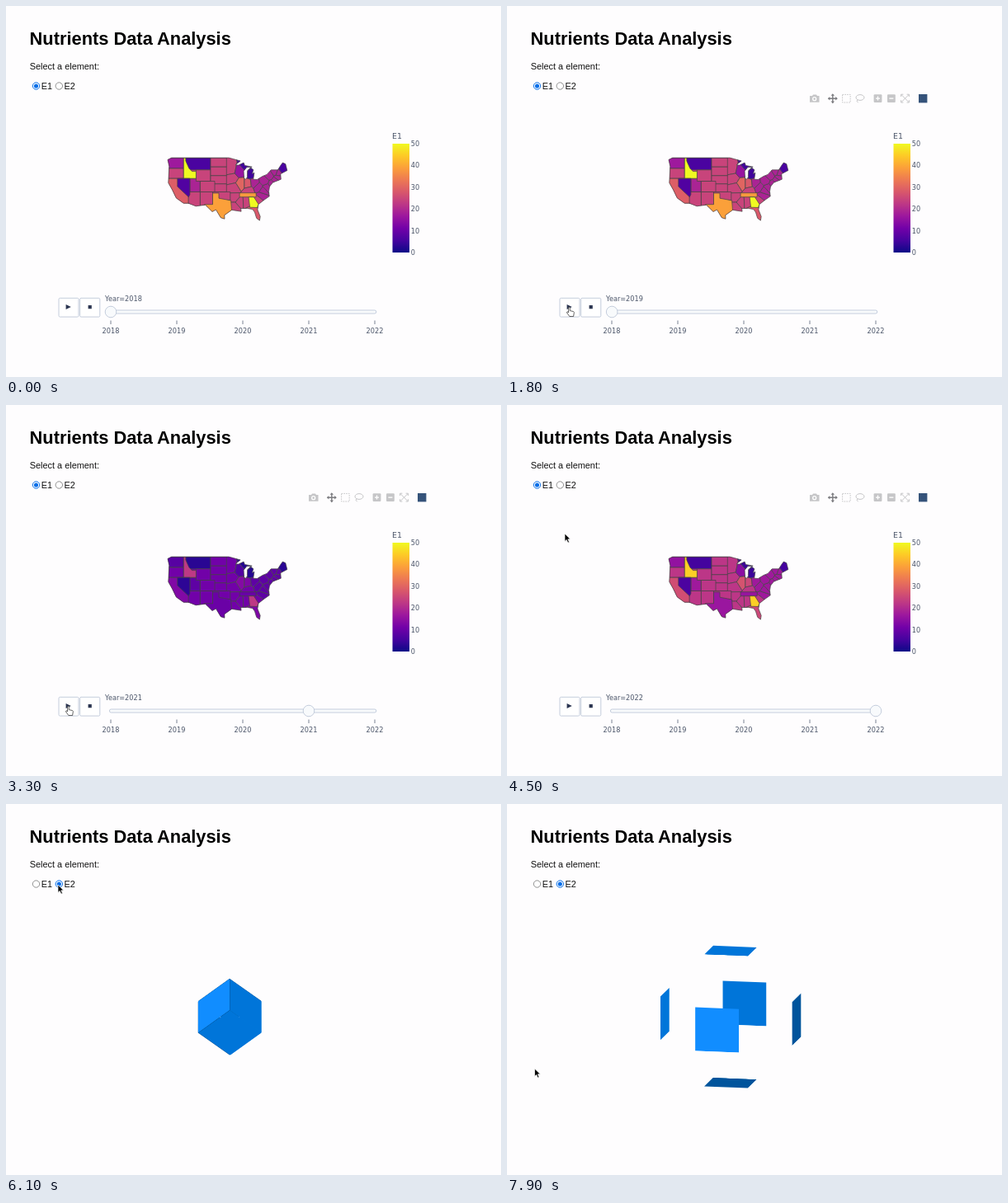
An HTML page that plays this animation: 600 px wide and 450 px high, repeating every 8 s.

```html
<!DOCTYPE html>
<html lang="en">
<head>
<meta charset="utf-8">
<title>Nutrients Data Analysis</title>
<style>
  html, body { margin: 0; width: 100%; height: 100%; overflow: hidden; background: #fefdfe; }
  svg { position: absolute; left: 0; top: 0; }
  .page { font: 10.9px "Liberation Sans", Arial, sans-serif; fill: #111; }
  .page .title { font-size: 21.84px; font-weight: bold; fill: #000; }
  #plot { font: 8.16px "DejaVu Sans", Verdana, sans-serif; fill: #4a5468; }
  .mid { text-anchor: middle; }
  .control { fill: #fff; stroke: #bec8d9; stroke-width: .9; }
  .soft { fill: #f8fafc; }
  .glyph { fill: #2a3450; }
  #states path { stroke: #444; stroke-width: .7; stroke-linejoin: round; }
  #modebar { fill: #c6c6c8; }
  #modebar .line { fill: none; stroke: #c6c6c8; }
  #modebar .sign { fill: none; stroke: #fff; stroke-width: 1.3; }
  #modebar .active { fill: #7c7c80; }
  .ring { fill: #fff; stroke: #767676; stroke-width: .8; }
  .on .ring { stroke: #0a6fe8; stroke-width: 1; }
  .dot { fill: #0a6fe8; visibility: hidden; }
  .on .dot { visibility: visible; }
  #cube {
    position: absolute; left: 244.3px; top: 230.5px; width: 54.4px; height: 54.4px;
    transform-style: preserve-3d; transform: rotateX(var(--turn)) rotateY(var(--turn));
  }
  #cube i { position: absolute; inset: 0; background: #0075d9; transform: var(--side) translateZ(var(--gap)); }
  #cube .front { --side: rotateY(0deg); background: #118dff; }
  #cube .back { --side: rotateY(180deg); }
  #cube .left { --side: rotateY(-90deg); }
  #cube .right { --side: rotateY(90deg); background: #00549c; }
  #cube .top { --side: rotateX(90deg); }
  #cube .bottom { --side: rotateX(-90deg); background: #00549c; }
</style>
</head>
<body>
<svg width="600" height="450" viewBox="0 0 600 450">
  <defs>
    <linearGradient id="scale" x1="0" y1="1" x2="0" y2="0"></linearGradient>
    <clipPath id="land"><path id="coast"/></clipPath>
  </defs>
  <g class="page">
    <text class="title" x="28.6" y="47">Nutrients Data Analysis</text>
    <text x="28.8" y="76.5">Select a element:</text>
    <g id="radio1"><circle class="ring" cx="36.5" cy="97" r="4.2"/><circle class="dot" cx="36.5" cy="97" r="2.6"/></g>
    <text x="42.8" y="101">E1</text>
    <g id="radio2"><circle class="ring" cx="64.3" cy="97" r="4.2"/><circle class="dot" cx="64.3" cy="97" r="2.6"/></g>
    <text x="70.6" y="101">E2</text>
  </g>
  <g id="plot">
    <g id="states" clip-path="url(#land)"></g>
    <use href="#coast" fill="none" stroke="#444" stroke-width=".7"/>
    <text x="468" y="161" font-size="9.4">E1</text>
    <rect x="468.5" y="167" width="20.5" height="132" fill="url(#scale)"/>
    <g id="ticks"></g>
    <rect class="control" x="64" y="354.3" width="24" height="22.8" rx="1.5"/>
    <rect class="control" x="89.6" y="354.3" width="24.2" height="22.8" rx="1.5"/>
    <path class="glyph" d="M72.6 362l6.2 3-6.2 3zM99.6 363h4.2v4.2h-4.2z"/>
    <text id="year" x="120" y="357.8"></text>
    <rect class="control soft" x="125.4" y="369" width="323.4" height="4" rx="2"/>
    <circle id="grip" class="control soft" cy="371" r="6.8"/>
    <g id="modebar">
      <path d="M367 109h3l1-1.5h4l1 1.5h2.5v7.8H367z"/>
      <circle class="sign" cx="372.7" cy="112.7" r="2"/>
      <path d="M394.8 107v10.4M389.6 112.2H400" stroke="#7c7c80" stroke-width="1.4"/>
      <path id="tip" class="active" d="M392.6 108.8l2.2-2.6 2.2 2.6z"/>
      <use href="#tip" transform="rotate(90 394.8 112.2)"/>
      <use href="#tip" transform="rotate(180 394.8 112.2)"/>
      <use href="#tip" transform="rotate(270 394.8 112.2)"/>
      <rect class="line" x="406.6" y="107.4" width="9.6" height="9.6" stroke-dasharray="1.6 1.2"/>
      <ellipse class="line" cx="428" cy="111" rx="5" ry="3.4"/>
      <path class="line" d="M425 113.6q-2 2 .6 3.6"/>
      <rect x="444.6" y="107.2" width="9.8" height="9.8" rx="1"/>
      <path class="sign" d="M447 112.1h5M449.5 109.6v5"/>
      <rect x="461" y="107.2" width="9.8" height="9.8" rx="1"/>
      <path class="sign" d="M463.4 112.1h5"/>
      <path class="line" d="M478 107.6l9 9M487 107.6l-9 9"/>
      <rect class="line" x="477.6" y="107.2" width="9.8" height="9.8" stroke-dasharray="2.8 4.2 2.8 0"/>
      <rect x="499" y="107" width="10.4" height="10.4" fill="#35537a"/>
    </g>
  </g>
</svg>
<div id="cube"><i class="back"></i><i class="left"></i><i class="right"></i><i class="top"></i><i class="bottom"></i><i class="front"></i></div>
<svg width="600" height="450" viewBox="0 0 600 450">
  <g id="cursor" stroke="#fff" stroke-width=".7" stroke-linejoin="round">
    <path id="arrow" fill="#000" d="M0 0v9.4l2.2-2 1.6 3.7 1.7-.7-1.6-3.6h3z"/>
    <path id="hand" fill="#fff" stroke="#222" d="M-.9 0c0-1.2 1.7-1.2 1.7 0v3.6l4 .9c.9.3 1.1.9 1 1.700l-.7 4.300H.3C-.6 8.800-2 7.600-2.900 6c-.4-1 .7-1.500 1.400-.8l.6.7z"/>
  </g>
</svg>
<script>
const LOOP = 8000, CLICK = 5500, LOAD = 5600;
const STEPS = [1760, 2280, 2780, 3320];   // start of 2019 ... 2022
const $ = id => document.getElementById(id);
const clamp = x => Math.min(1, Math.max(0, x));
const mix = (a, b, k) => a + (b - a) * k;
const ease = x => x < .5 ? 4 * x ** 3 : 1 - 4 * (1 - x) ** 3;
const show = (node, on) => { node.style.display = on ? '' : 'none'; };
const numbers = text => text.trim().split(/\s+/).map(Number);
function add(parent, tag, attrs, text = '') {
  const node = document.createElementNS('http://www.w3.org/2000/svg', tag);
  for (const k in attrs) node.setAttribute(k, attrs[k]);
  node.textContent = text;
  return parent.appendChild(node);
}

// Mercator, from degrees west and north
function project(west, north) {
  const m = Math.log(Math.tan(Math.PI / 4 + north * Math.PI / 360)) * 180 / Math.PI;
  return [509 - 2.51 * west, 184 + 2.51 * (56.4 - m)];
}
function projectAll(text) {
  const n = numbers(text);
  return n.filter((_, i) => i % 2).map((north, i) => project(n[2 * i], north));
}
const outline = points => 'M' + points.map(p => p.map(v => v.toFixed(1))).join('L') + 'Z';

// Key points round the country
const COAST = `124.7 48.4 122.8 49 95.2 49 93 48.6 89.6 48 92 46.7 90.5 46.6 88 47.4 87.5 46.5 84 46
  86.5 45.9 88 44.6 87.8 42 87 41.7 86.3 42.4 86.2 44.7 84.7 45.8 83.3 45 83.9 43.7 82.9 44 83.4 41.7
  81.5 41.6 78.9 42.8 76.8 43.4 74.8 45 71.5 45 70 46.700 69.2 47.4 67.8 47 67 44.8 70.2 43.6 70 41.7
  74 40.5 75.5 39 75.9 37.2 75.6 35.3 78 33.9 80.9 32 81.3 29.8 80 26.9 80.3 25.2 81.8 26.2 82.7 28.8 83.8 30
  86.3 30.4 89.4 30.3 89.2 29.1 93.8 29.7 97.3 27.5 97.2 25.9 99.1 26.4 101.4 29.8 103.2 29 106.5 31.8
  111.1 31.3 114.8 32.5 117.1 32.5 120.6 34.6 122.5 37.8 124.4 40.4 124 46.2`;

// 2018 readings; later years follow by a common factor, except where they fell
const COMMON = 24.5, EAST = 'OH PA NY VA NC WV MD NJ VT NH MA CT';
const LEVEL = { ID: 50, GA: 50, TX: 39, TN: 38, CA: 29, IL: 30, IN: 28, FL: 28, WA: 17, UT: 19, WI: 16, MT: 6, NV: 7, ME: 6, MI: 5 };
for (const s of EAST.split(' ')) LEVEL[s] = 19;
const CHANGE = [1, 1, .75, .45, .9], FELL = [1, 1, .65, .26, .42];

const states = [];
function state(name, points) {
  states.push({
    level: LEVEL[name] || COMMON,
    change: name === 'TX' || name === 'TN' ? FELL : CHANGE,
    node: add($('states'), 'path', { d: outline(points) })
  });
}
// Boxes of equal height, one below the other
function column(names, west, east, north, height) {
  names.split(' ').forEach((name, i) => {
    const n = north - i * height, s = n - height;
    state(name, [project(west, n), project(east, n), project(east, s), project(west, s)]);
  });
}
// The part of a polygon nearer to a than to b
function nearer(points, a, b) {
  const side = p => (p[0] - (a[0] + b[0]) / 2) * (b[0] - a[0]) + (p[1] - (a[1] + b[1]) / 2) * (b[1] - a[1]);
  return points.flatMap((p, i) => {
    const q = points[(i + 1) % points.length], u = side(p), v = side(q);
    const kept = u <= 0 ? [p] : [];
    if (u * v < 0) kept.push([0, 1].map(k => mix(p[k], q[k], u / (u - v))));
    return kept;
  });
}

// The irregular states: each takes the land nearest its centre
const CENTRES = `MN 94.3 45.2, IA 93.5 42, MO 92.5 38.4, AR 92.4 34.8, LA 92.3 31, WI 89.8 44.5, IL 89.2 40,
  IN 86.2 40, MI 84.7 43.7, MI 86.8 46.4, OH 82.8 40.3, KY 85.5 37.4, MS 89.7 32.9, AL 86.8 33,
  FL 84.5 29, SC 80.9 33.9, NC 79.4 35.5, VA 78.6 37.5, WV 80.8 38.7, MD 76.8 38.8, PA 77.8 40.9,
  NY 75.3 42.9, NJ 74.4 40, VT 72.7 44.1, NH 71.5 43.8, MA 71.8 42.3, CT 72.7 41.4, ME 69 45.3`;
const centres = CENTRES.split(',').map(row => {
  const [name, west, north] = row.trim().split(' ');
  return { name, at: project(+west, +north) };
});
const frame = [[190, 170], [350, 170], [350, 270], [190, 270]];
for (const a of centres)
  state(a.name, centres.reduce((cell, b) => a === b ? cell : nearer(cell, a.at, b.at), frame));

column('WA OR', 125, 117, 49, 3.5);
column('CA', 125, 114.6, 42, 10);
column('UT', 114, 109, 42, 5);
column('AZ', 114.7, 109, 37, 6);
column('MT', 116, 104, 49, 4);
column('WY', 111, 104, 45, 4);
column('CO', 109, 102, 41, 4);
column('ND SD NE KS', 104, 96.3, 49, 3);
column('CO', 109, 102, 41, 4);
column('NM', 109, 103, 37, 6);
column('OK', 103, 94.5, 37, 3.3);
column('TN', 90, 82, 36.6, 1.6);

state('ID', projectAll('117 49 116 49 116 48 114.4 45.5 113 44.5 111 44.5 111 42 117 42'));
state('NV', projectAll('120 42 114 42 114 36 114.6 35 120 39'));
state('TX', projectAll('103 36.5 100 36.5 100 34.5 94.2 33.6 93.8 29 97 25 107 29 107 32 103 32'));
state('GA', projectAll('85.6 35 83.1 35 80.8 32 81.5 30.7 85 30.8'));
$('coast').setAttribute('d', outline(projectAll(COAST)));

const PLASMA = '0d0887 46039f 7201a8 9c179e bd3786 d8576b ed7953 fb9f3a fdca26 f0f921'.split(' ');
const rgb = hex => [0, 2, 4].map(i => parseInt(hex.substr(i, 2), 16));
function plasma(value) {
  const p = clamp(value / 50) * 9, i = Math.min(8, Math.floor(p));
  const a = rgb(PLASMA[i]), b = rgb(PLASMA[i + 1]);
  return `rgb(${a.map((c, k) => Math.round(mix(c, b[k], p - i)))})`;
}
let painted = -1;
function paint(year) {
  if (year === painted) return;
  painted = year;
  for (const s of states) s.node.setAttribute('fill', plasma(s.level * s.change[year]));
}

PLASMA.forEach((c, i) => add($('scale'), 'stop', { offset: i / 9, 'stop-color': '#' + c }));
for (let v = 0; v <= 50; v += 10) add($('ticks'), 'text', { x: 490.8, y: 302 - v * 2.64 }, v);
for (let i = 0; i < 5; i++) {
  const x = 127 + 80 * i;
  add($('ticks'), 'path', { d: `M${x} 381.5v4.5`, stroke: '#566078', 'stroke-width': .8 });
  add($('ticks'), 'text', { x, y: 397, class: 'mid' }, 2018 + i);
}

// Pointer moves: start, end, x, y
const MOVES = [[400, 1100, 75.5, 366], [3650, 4300, 70, 156], [4700, 5200, 63, 98], [7300, 7750, 33.5, 321]];
function pointer(t) {
  return MOVES.reduce(([x, y], [from, to, x1, y1]) => {
    const k = ease(clamp((t - from) / (to - from)));
    return [mix(x, x1, k), mix(y, y1, k)];
  }, [250, 320]);
}

function drawPlot(t, y) {
  const year = STEPS.filter(s => t >= s).length;
  paint(STEPS.filter(s => t >= s + 80).length);
  $('year').textContent = 'Year=' + (2018 + year);
  const slide = STEPS.reduce((sum, s) => sum + ease(clamp((t - s) / 500)), 0);
  $('grip').setAttribute('cx', 127 + 80 * slide);
  show($('modebar'), t >= 400 && y > 104);
}
function drawCube(t) {
  const u = (t - 6100) / 1000;
  const turn = Math.max(0, 360 - 135 * Math.exp(.2886 * u * u - 1.883 * u));
  const gap = 54.4 * mix(.5, 1.5, ease(clamp((t - 6150) / 650)));
  $('cube').style.setProperty('--turn', turn + 'deg');
  $('cube').style.setProperty('--gap', gap + 'px');
}

function render(t) {
  const [x, y] = pointer(t), overButton = x > 64 && x < 114 && y > 354 && y < 377;
  $('cursor').setAttribute('transform', `translate(${x} ${y})`);
  show($('cursor'), t >= 400);
  show($('hand'), overButton);
  show($('arrow'), !overButton);
  $('radio1').classList.toggle('on', t < CLICK);
  $('radio2').classList.toggle('on', t >= CLICK);
  show($('plot'), t < LOAD);
  show($('cube'), t >= LOAD);
  if (t < LOAD) drawPlot(t, y); else drawCube(t);
}

const start = performance.now();
function tick() {
  render((performance.now() - start) % LOOP);
  requestAnimationFrame(tick);
}
tick();
</script>
</body>
</html>
```
